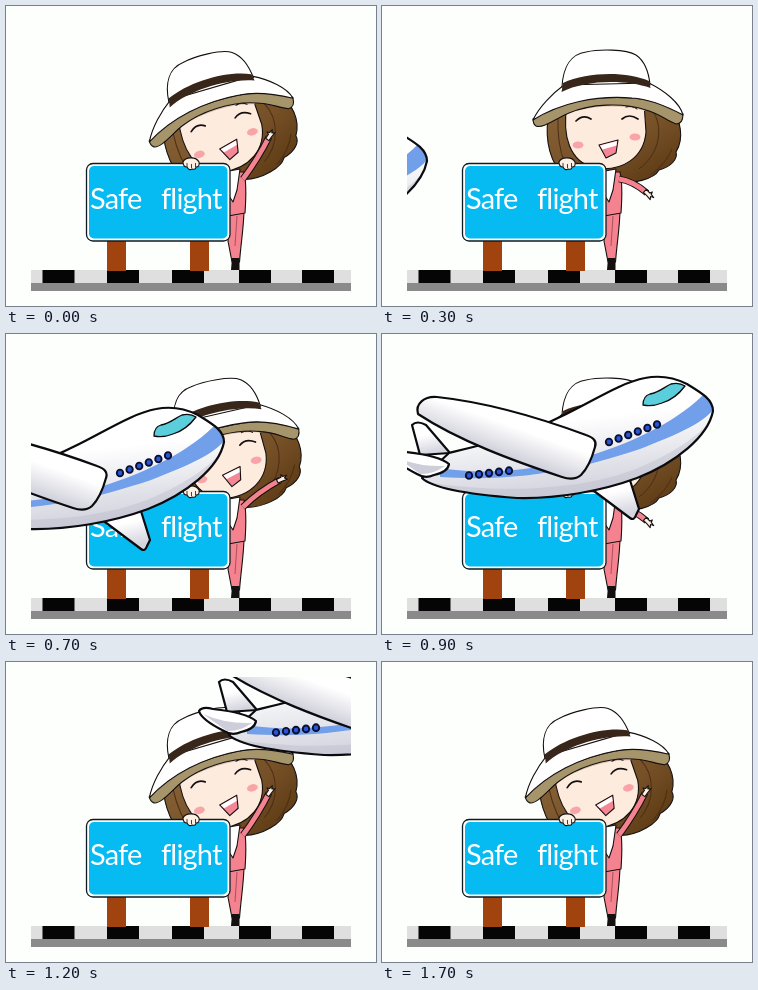
Animation of 370x300 px, one loop 1800 ms. Source, as an HTML page:

```html
<!DOCTYPE html>
<html lang="en">
<head>
<meta charset="utf-8">
<title>Safe flight</title>
<style>
html, body { margin: 0; width: 100%; height: 100%; overflow: hidden; background: #fdfffc; }
svg { display: block; width: 370px; height: 300px; }
.ink { stroke: #151010; stroke-width: 1.1; stroke-linejoin: round; stroke-linecap: round; }
.bold { stroke: #0b0b0f; stroke-width: 2.2; stroke-linejoin: round; stroke-linecap: round; }
.line { fill: none; }
text { font: 400 29px Lato, sans-serif; letter-spacing: -.8px; fill: #fff; font-variant-ligatures: none; }
</style>
</head>
<body>
<svg viewBox="0 0 370 300">
  <defs>
    <clipPath id="view"><rect x="25" y="15" width="320" height="270"/></clipPath>
    <linearGradient id="hair" x1="0" y1="0" x2="1" y2="1">
      <stop offset="0" stop-color="#876338"/>
      <stop offset=".55" stop-color="#765027"/>
      <stop offset="1" stop-color="#56350f"/>
    </linearGradient>
    <linearGradient id="metal" x1="0" y1="0" x2=".25" y2="1">
      <stop offset=".45" stop-color="#fff"/>
      <stop offset="1" stop-color="#d3d4de"/>
    </linearGradient>
    <linearGradient id="wing" gradientUnits="userSpaceOnUse" x1="132" y1="76" x2="114" y2="126">
      <stop offset=".3" stop-color="#fff"/>
      <stop offset="1" stop-color="#c6c6d3"/>
    </linearGradient>
    <path id="hull" d="M40 144C52 156 95 161 135 164C175 165 220 157 255 144C293 129 326 103 331 77C331 65 318 58 305 50C293 44 278 41 263 44C240 48 211 67 180 82C145 100 103 110 67 119Z"/>
    <clipPath id="hullClip"><use href="#hull"/></clipPath>
  </defs>

  <g clip-path="url(#view)">
    <g id="road">
      <rect x="25" y="264" width="320" height="13" fill="#dfdfdf"/>
      <g id="stripes" fill="#050505"></g>
      <rect x="25" y="277" width="320" height="8" fill="#8a8a8a"/>
    </g>

    <g id="head">
      <path class="ink" fill="url(#hair)" d="M170 102C163 115 163 141 174 160L233 175C251 179 272 173 277 164C289 161 296 153 294 146C302 133 300 113 286 98Z"/>
      <path class="line" stroke="#4c2d14" d="M272 107C282 125 276 149 257 163M268 169C279 162 286 152 290 143M176 112Q175 138 183 158"/>
      <path class="ink" fill="#fdebdd" d="M185 99C180 129 187 156 213 162C241 166 262 151 264 126L262 97Z"/>
      <path fill="#dcc4b4" d="M185 99L262 96L263 105C240 98 210 99 184 108Z"/>
      <g class="ink line">
        <path d="M193 103Q198 100 203 102M244 101Q250 99 255 103" stroke-width="1"/>
        <path d="M194 115Q201 108 209 113M240 113Q247 107 256 113" stroke-width="1.7"/>
      </g>
      <ellipse cx="196" cy="139" rx="5.5" ry="3.6" fill="#f9a4a8"/>
      <ellipse cx="253" cy="131" rx="5.5" ry="3.6" fill="#f9a4a8"/>
      <path class="ink" fill="#f48796" d="M217 139L236 134L234 147L224 152Z"/>
      <path fill="#fff" d="M218 139.5L235 135L234.500 139.500L220.500 143.500Z"/>
      <path class="ink" fill="#a6956b" d="M151 113C178 89 270 82 301 108Q301 118 294 118C284 114 276 107 264 104C240 96 208 98 187 107C175 112 161 123 154 120Q151 118 151 113Z"/>
      <path class="ink" fill="#fff" d="M151 114C157 101 171 87 182 79L267 77C283 85 298 97 301 109C286 101 268 93 250 92C214 89 178 97 151 114Z"/>
      <path class="ink" fill="#fff" d="M180 81C181 61 189 48 204 46C217 43 244 43 254 49C264 56 267 68 268 79Q224 64 180 81Z"/>
      <path fill="#39261b" d="M181 77C205 66 244 65 267 75L268.500 82C243 73 203 74 179.500 86Z"/>
    </g>

    <g id="body">
      <path class="ink" fill="#f5838f" d="M223 200L238 203C238 220 235 236 233.500 256H226L222 235Z"/>
      <path fill="#151010" d="M226 252H233.500V264H225Z"/>
      <path class="line" stroke="#b14d5c" d="M231 210L229 240"/>
      <path class="ink" fill="#f5838f" d="M222 166L238 166C241 178 240 193 239 207L222 210Z"/>
      <path class="ink" fill="#fff" d="M223 165L234 163L231 184L227 196L223 190Z"/>
    </g>

    <g id="arm">
      <path id="sleeveEdge" class="line" stroke="#151010" stroke-width="6.800"/>
      <path id="sleeve" class="line" stroke="#f5838f" stroke-width="4.800"/>
      <path id="hand" class="ink" fill="#fdf0e5" d="M-3 -2L2 -2L3 -4.500L4 -2L8 -1.500L5 0L7 2.500L2 2L-3 2Z"/>
    </g>

    <g id="sign">
      <path fill="#a0430f" d="M101 232H120V265H101ZM184 232H203V265H184Z"/>
      <rect x="80.500" y="157.500" width="143.500" height="77.500" rx="6.500" fill="#fff" stroke="#0d1c22" stroke-width="1.300"/>
      <rect x="83" y="160" width="138.500" height="72.500" rx="5" fill="#06baf2"/>
      <text y="203"><tspan x="84">Safe</tspan><tspan x="155">flight</tspan></text>
      <path class="ink" fill="#fdf0e5" d="M177 156C179 151 190 150 193 156Q194 161 190 161Q190 164 186 163Q183 165 181 161Q177 161 177 156Z"/>
      <path class="line" stroke="#151010" stroke-width=".8" d="M181 157V161M185.500 158V162M189.500 157V161"/>
    </g>

    <g id="plane">
      <path class="bold" fill="url(#metal)" d="M30 91Q35 86 44 91L68 119L38 121Z"/>
      <path class="bold" fill="url(#metal)" d="M208 154L248 184Q252 187 254 181L257 175L247 143Z"/>
      <use href="#hull" fill="url(#metal)"/>
      <g clip-path="url(#hullClip)">
        <path fill="#b8bac7" opacity=".4" d="M39 147C125 162 208 154 256 134C290 120 320 101 333 80L333 170H39Z"/>
        <path fill="#729fe9" d="M58 134C100 141 150 138 210 121C255 107 300 84 324 58L334 72C325 86 305 97 258 115C212 130 150 149 58 143Z"/>
      </g>
      <use href="#hull" class="bold" fill="none"/>
      <path class="bold" fill="#5acfdb" d="M261 71Q261 62 268 60C278 58 282 53 289 50Q297 48 303 52C297 60 290 66 280 69Q270 73 261 71Z" style="stroke-width:1.3"/>
      <g id="windows" fill="#2c55d6" stroke="#091030" stroke-width="1.900"></g>
      <path class="bold" fill="url(#wing)" d="M36 80C33 70 42 62 55 63C102 68 158 84 204 101Q216 105 213 113C210 124 206 134 199 141Q192 147 180 143C132 127 77 107 36 80Z"/>
      <path class="bold" fill="#fff" d="M10 120Q13 115 24 118C42 120 60 124 67 130Q66 138 52 141Q43 145 35 140C25 135 12 128 10 120Z"/>
      <path fill="#cdced9" d="M14 123L38 140Q50 141 63 132Q36 133 14 123Z"/>
    </g>
  </g>
</svg>
<script>
const LOOP = 1800, STEP = 100;
const $ = id => document.getElementById(id);

function add(parent, tag, attrs) {
  const el = document.createElementNS("http://www.w3.org/2000/svg", tag);
  for (const k in attrs) el.setAttribute(k, attrs[k]);
  parent.append(el);
}

for (const x of [36.5, 101, 166, 233, 296])
  add($("stripes"), "rect", { x, y: 264, width: 32, height: 13 });

function windowRow(n, x, y, dx, dy) {
  for (let i = 0; i < n; i++)
    add($("windows"), "ellipse", { cx: x + dx * i, cy: y + dy * i, rx: 3.2, ry: 3.4 });
}
windowRow(6, 227, 108, 9.6, -3.5);
windowRow(5, 87, 141.5, 10, -1.2);

// Head tilt and shift, then the raised arm's elbow and wrist.
const poses = [
  { tilt: -15, x: -10.5, y: 2.5, elbow: [252, 153], wrist: [263, 131], turn: -55 },
  { tilt: -11.5, x: -6, y: 1, elbow: [252, 158], wrist: [274, 146], turn: -25 },
  { tilt: 0, x: 0, y: 0, elbow: [251, 175], wrist: [265, 187], turn: 45 }
];
const sway = [0, 1, 2, 2, 1, 0];

// Flight path: step, x, y
const route = [[3, -286, 78], [7, -113, 31], [9, 0, 0], [12, 183, -71], [14, 281, -104]];

function slope(i, axis) {
  const a = route[Math.max(i - 1, 0)], b = route[Math.min(i + 1, route.length - 1)];
  return (b[axis] - a[axis]) / (b[0] - a[0]);
}

function along(step, axis) {
  const last = route.length - 1;
  if (step <= route[0][0]) return route[0][axis] + slope(0, axis) * (step - route[0][0]);
  if (step >= route[last][0]) return route[last][axis] + slope(last, axis) * (step - route[last][0]);
  let i = 0;
  while (step > route[i + 1][0]) i++;
  const a = route[i], b = route[i + 1], w = b[0] - a[0];
  const u = (step - a[0]) / w, v = 1 - u;
  return v * v * (1 + 2 * u) * a[axis] + u * u * (3 - 2 * u) * b[axis]
    + w * u * v * (v * slope(i, axis) - u * slope(i + 1, axis));
}

function draw(time) {
  const step = Math.floor((time % LOOP) / STEP);
  const p = poses[sway[step % sway.length]];
  $("head").setAttribute("transform", `translate(${p.x} ${p.y}) rotate(${p.tilt} 226 112.5)`);
  const d = `M237 173Q${p.elbow} ${p.wrist}`;
  $("sleeveEdge").setAttribute("d", d);
  $("sleeve").setAttribute("d", d);
  $("hand").setAttribute("transform", `translate(${p.wrist}) rotate(${p.turn})`);
  $("plane").setAttribute("transform", `translate(${along(step, 1)} ${along(step, 2)})`);
  $("plane").setAttribute("visibility", step > 2 && step < 15 ? "visible" : "hidden");
}

const start = performance.now();
function tick() {
  draw(performance.now() - start);
  requestAnimationFrame(tick);
}
tick();
</script>
</body>
</html>
```
